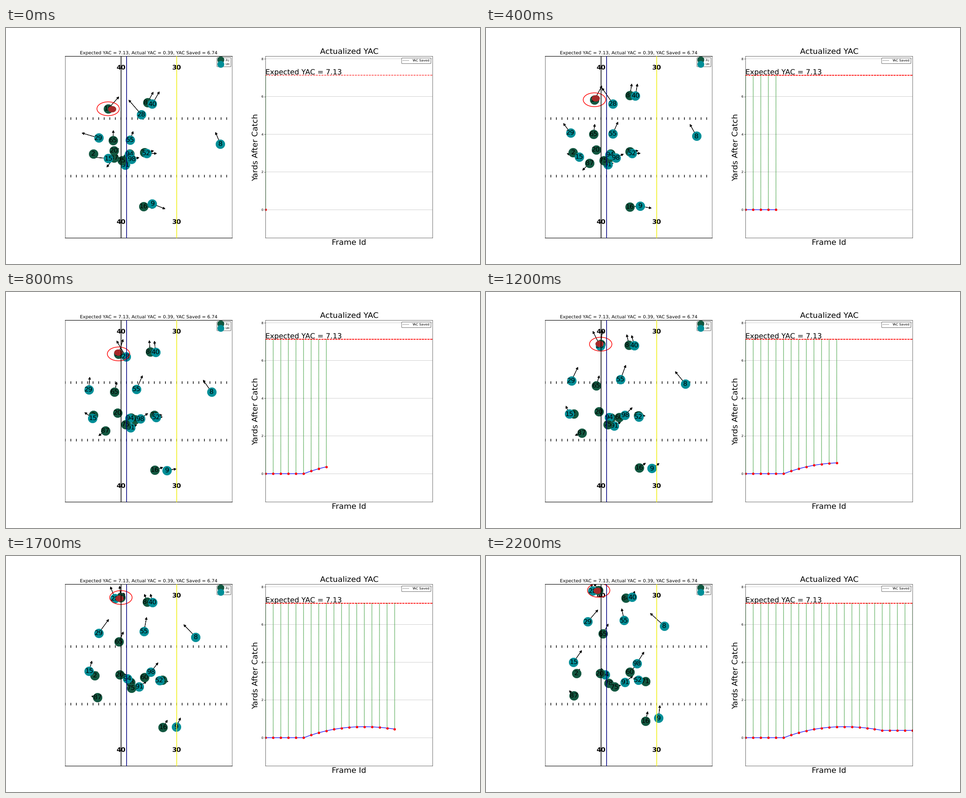
These frames come from a looping animation (1058x529 px, 2.3 s). A matplotlib script:

```python
import numpy as np
import matplotlib.pyplot as plt
from matplotlib.animation import FuncAnimation
from matplotlib.lines import Line2D
from matplotlib.patches import Ellipse

# Soft edges instead of pixel snapping
plt.rcParams.update({"path.snap": False, "text.hinting": "none",
                     "legend.edgecolor": "black"})

FRAMES, STEP_MS = 23, 100
GREEN, TEAL = "#125740", "#008E97"
EXPECTED, FINAL = 7.13, 0.39
CATCH, DOWN = 5, 18          # frames where the run starts and ends


class Path:
    """Polynomial through a few points evenly spaced over the loop."""

    def __init__(self, *points):
        t = np.linspace(0, FRAMES - 1, len(points))
        self.pos = [np.poly1d(np.polyfit(t, c, len(t) - 1)) for c in zip(*points)]
        self.vel = [p.deriv() for p in self.pos]

    def at(self, i):
        return [p(i) for p in self.pos]

    def speed(self, i):
        return [v(i) for v in self.vel]


class Player:
    count = 0

    def __init__(self, number, color, *points):
        Player.count += 1
        z = 1 + Player.count / 100
        self.path = Path(*points)
        self.arrow = field.arrow(0, 0, 1, 1, width=0.01, head_width=5, head_length=5,
                                 color="black", lw=1.3, zorder=0.9)
        self.dot, = field.plot([], [], "o", color=color, ms=27.5, zorder=z)
        self.label = field.text(0, 0, number, fontsize=20, ha="center",
                                va="center", zorder=z, clip_on=True)

    def move(self, i):
        x, y = self.path.at(i)
        vx, vy = self.path.speed(i)
        self.dot.set_data([x], [y])
        self.label.set_position((x, y))
        self.arrow.set_data(x=x, y=y, dx=5 * vx, dy=5 * vy)


def gained(i):
    """Yards after the catch: a rise, then a slight push back."""
    s = np.clip((i - CATCH) / (DOWN - CATCH), 0, 1)
    return FINAL * s + 1.62 * s * (1 - s) * (1 - 0.16 * s)


fig, (field, chart) = plt.subplots(1, 2, figsize=(20, 10), dpi=52.9)

# Field, with stage pixels as data units
box = field.get_position()
left, right = box.x0 * 1058, box.x1 * 1058
yard = (right - left) / 30
field.set_xlim(left, right)
field.set_ylim((1 - box.y0) * 529, (1 - box.y1) * 529)
field.set_xticks([])
field.set_yticks([])
for side in ("top", "bottom"):
    field.spines[side].set_linewidth(1.5)
field.set_title("Expected YAC = 7.13, Actual YAC = 0.39, YAC Saved = 6.74", fontsize=14)

for y in (203, 332):
    field.vlines(left + yard * np.arange(30), y - 2.8, y + 2.8, color="black",
                 lw=2, zorder=0.7)
for n, text in ((10, "40"), (20, "30")):
    for y in (89, 435):
        field.text(left + n * yard, y, text, fontsize=20, weight="bold",
                   ha="center", va="center", zorder=0.8)
for n, color in ((10, "black"), (11, "navy"), (20, "#f0ee10")):
    field.axvline(left + n * yard + 0.3, color=color, lw=2.1, zorder=3)

# Back to front
runner = Player("10", GREEN, (228, 181), (250, 142.5), (257, 103.5), (251.5, 77))
players = [
    Player("71", GREEN, (309, 279), (338, 276.5), (356, 281)),
    Player("52", TEAL, (313.5, 281), (339.5, 280.5), (339.5, 278)),
    Player("91", TEAL, (266, 307), (284, 301), (310, 283)),
    Player("78", GREEN, (276, 282), (279.5, 282), (274, 285)),
    Player("60", GREEN, (271, 291), (295, 282), (321, 260)),
    Player("94", TEAL, (275.5, 283), (275, 281.5), (265.5, 266)),
    Player("87", GREEN, (241, 291), (215.5, 315), (196.5, 312.5)),
    Player("20", GREEN, (241, 275), (251.5, 269), (254.5, 263.5)),
    Player("75", GREEN, (258.5, 297), (271, 297), (287.5, 293.5)),
    Player("98", TEAL, (280, 294), (307.5, 278), (336.5, 241)),
    Player("84", GREEN, (316, 167), (322, 137), (317, 109.5), (312, 94.5)),
    Player("40", TEAL, (326.5, 170.5), (334, 138), (328.5, 111), (326.5, 92.5)),
    Player("28", TEAL, (302, 194), (270, 149), (248, 106.5), (238, 78.5)),
    Player("2", GREEN, (195, 282), (195.5, 274), (202, 263)),
    Player("15", TEAL, (228.5, 292.5), (187, 276), (195.5, 238)),
    Player("16", GREEN, (307, 400), (339.5, 395.5), (356, 370)),
    Player("9", TEAL, (326.5, 394), (367.5, 397), (385, 363.5)),
    Player("29", TEAL, (206.5, 246.5), (184.5, 222), (198.5, 185), (227, 147.5)),
    Player("55", TEAL, (277, 251), (290, 221), (305, 181.5), (308.5, 144.5)),
    Player("65", GREEN, (239, 252), (245, 213.5), (261, 174.5)),
    Player("8", TEAL, (478.5, 260), (448.5, 210.5), (398, 157)),
    runner,
]
flight = Path((237, 182), (253, 121), (249, 78))
ball = field.add_patch(Ellipse((0, 0), 17.5, 13.5, color="brown", zorder=2))
ring = field.add_patch(Ellipse((0, 0), 50, 31, fill=False, ec="red", lw=2, zorder=2.1))

teams = [Line2D([], [], color=c, marker="o", ms=20, ls="", label=t)
         for c, t in ((GREEN, "ZLJ"), (TEAL, "UIX"))]
field.legend(handles=teams, loc="upper right", fontsize=8,
             labelspacing=0.7).set_zorder(5)

# Chart
steps = np.arange(FRAMES)
yards = gained(steps)
chart.set_xlim(0, FRAMES - 1)
chart.set_ylim(-1.5, EXPECTED + 1)
chart.set_xticks([])
chart.set_yticks(range(0, 9, 2))
chart.grid(axis="y")
chart.set_title("Actualized YAC", fontsize=24)
chart.set_xlabel("Frame Id", fontsize=24)
chart.set_ylabel("Yards After Catch", fontsize=24)
chart.text(0, EXPECTED + 0.05, "Expected YAC = 7.13", fontsize=22)

# The dashed line grows denser over the first frames
dashes = [chart.axhline(EXPECTED, color="red", ls="--", lw=1.6) for _ in range(4)]
drops = [chart.plot([i, i], [y, EXPECTED], ls=(0, (1, 1)), color="green", lw=2.1)[0]
         for i, y in zip(steps, yards)]
curve, = chart.plot([], [], "b-", lw=1.7)
dots, = chart.plot([], [], "ro", ms=6.5)
chart.legend(handles=[Line2D([], [], color="black", ls=":", lw=1.5, label="YAC Saved")],
             loc="upper right")


def draw(i):
    for p in players:
        p.move(i)
    ball.set_center(flight.at(i))
    ring.set_center(runner.path.at(i))
    for group in (dashes, drops):
        for k, line in enumerate(group):
            line.set_visible(k <= i)
    for line in (curve, dots):
        line.set_data(steps[:i + 1], yards[:i + 1])
    return []


anim = FuncAnimation(fig, draw, frames=FRAMES, init_func=lambda: draw(0),
                     interval=STEP_MS, repeat=True, repeat_delay=0)
plt.show()
```
